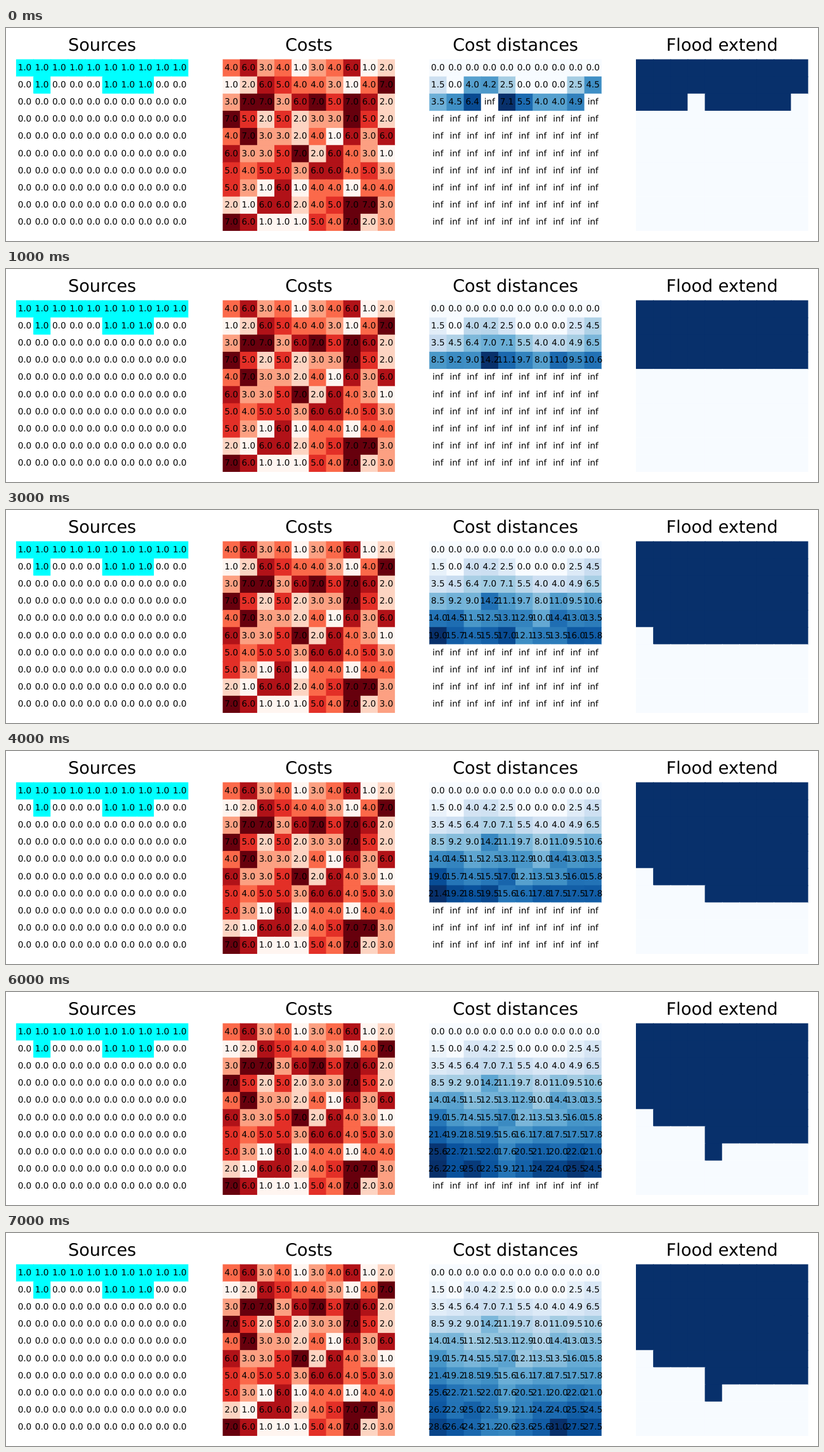
These frames come from a looping animation (1280x337 px, 10000 ms). An HTML page:

```html
<!DOCTYPE html>
<html lang="en">
<head>
<meta charset="utf-8">
<title>Flood spread by cost distance</title>
<style>
  html, body { margin: 0; width: 100%; height: 100%; overflow: hidden; background: #fff; }
  svg { display: block; }
  text {
    font: 13.55px "DejaVu Sans", sans-serif;
    text-anchor: middle;
    text-rendering: geometricPrecision;
    fill: #000;
  }
  .title { font-size: 27.1px; }
</style>
</head>
<body>
<svg id="stage" width="1280" height="337" viewBox="0 0 1280 337"></svg>
<script>
const N = 10, CELL = 27.15, LEFT = 15.9, PITCH = 325.7, TOP = 49.5;
const LOOP = 10000, STEP = 1000, STEPS = 8, REACH = 18;

const grid = rows => rows.split(' ').map(row => [...row].map(Number));
const costs = grid('4634134612 1265443147 3773675762 7525233752 4733241636 ' +
                   '6335726431 5455366453 5316144144 2166245773 7611154723');
const sources = grid('1111111111 0100011100' + ' 0000000000'.repeat(8));

const palette = hex => hex.split(' ').map(h => [0, 2, 4].map(i => parseInt(h.slice(i, i + 2), 16)));
const REDS = palette('fff5f0 fee0d2 fcbba1 fc9272 fb6a4a ef3b2c cb181d a50f15 67000d');
const BLUES = palette('f7fbff deebf7 c6dbef 9ecae1 6baed6 4292c6 2171b5 08519c 08306b');

function shade(stops, t) {
  const level = Math.min(255, Math.floor(t * 256)) / 255 * (stops.length - 1);
  const i = Math.min(stops.length - 2, Math.floor(level));
  const mix = stops[i].map((a, k) => Math.round(a + (stops[i + 1][k] - a) * (level - i)));
  return `rgb(${mix})`;
}

// Cost of entering (r, c) by way of its already reached neighbours.
function enter(dist, r, c) {
  let low = Infinity, total = Infinity;
  for (let y = r - 1; y <= r + 1; y++) {
    for (let x = c - 1; x <= c + 1; x++) {
      const near = dist[y]?.[x] ?? Infinity;
      if (near === Infinity) continue;
      const length = y !== r && x !== c ? Math.SQRT2 : 1;
      low = Math.min(low, near);
      total = Math.min(total, low + (costs[y][x] + costs[r][c]) / 2 * length);
    }
  }
  return Math.round(total * 10) / 10;
}

const spread = dist => dist.map((row, r) =>
  row.map((d, c) => d < Infinity ? d : enter(dist, r, c)));

const stage = document.getElementById('stage');

function add(parent, tag, attrs = {}, content) {
  const el = document.createElementNS('http://www.w3.org/2000/svg', tag);
  for (const key in attrs) el.setAttribute(key, attrs[key]);
  if (content !== undefined) el.textContent = content;
  return parent.appendChild(el);
}

// Inner cells reach under the next one, so that no seams show.
const extent = i => CELL + (i < N - 1 ? 1 : 0);

function panel(parent, slot, data, color, label) {
  const x0 = LEFT + slot * PITCH;
  const each = draw => data.forEach((row, r) => row.forEach((v, c) => draw(v, r, c)));
  each((v, r, c) => add(parent, 'rect', {
    x: x0 + c * CELL, y: TOP + r * CELL,
    width: extent(c), height: extent(r), fill: color(v)
  }));
  if (label) each((v, r, c) => add(parent, 'text', {
    x: x0 + (c + 0.5) * CELL, y: TOP + (r + 0.5) * CELL + 3.75
  }, label(v)));
}

const decimal = v => v < Infinity ? v.toFixed(1) : 'inf';

['Sources', 'Costs', 'Cost distances', 'Flood extend'].forEach((name, i) =>
  add(stage, 'text', { class: 'title', x: LEFT + i * PITCH + N * CELL / 2, y: 36 }, name));

panel(stage, 0, sources, v => v ? '#00ffff' : '#ffffff', decimal);
panel(stage, 1, costs, v => shade(REDS, (v - 1) / 6), decimal);

let dist = sources.map(row => row.map(v => v ? 0 : Infinity));
const scenes = Array.from({ length: STEPS }, () => {
  dist = spread(dist);
  const max = Math.max(...dist.flat().filter(isFinite));
  const scene = add(stage, 'g', { display: 'none' });
  panel(scene, 2, dist, v => v < Infinity ? shade(BLUES, v / max) : '#ffffff', decimal);
  panel(scene, 3, dist, v => shade(BLUES, v <= REACH ? 1 : 0));
  return scene;
});

let shown = -1;
function show(time) {
  const step = Math.min(STEPS - 1, Math.floor(time % LOOP / STEP));
  if (step === shown) return;
  scenes.forEach((scene, i) => scene.setAttribute('display', i === step ? 'inline' : 'none'));
  shown = step;
}

let start;
function tick(now) {
  start ??= now;
  show(now - start);
  requestAnimationFrame(tick);
}
show(0);
requestAnimationFrame(tick);
</script>
</body>
</html>
```
